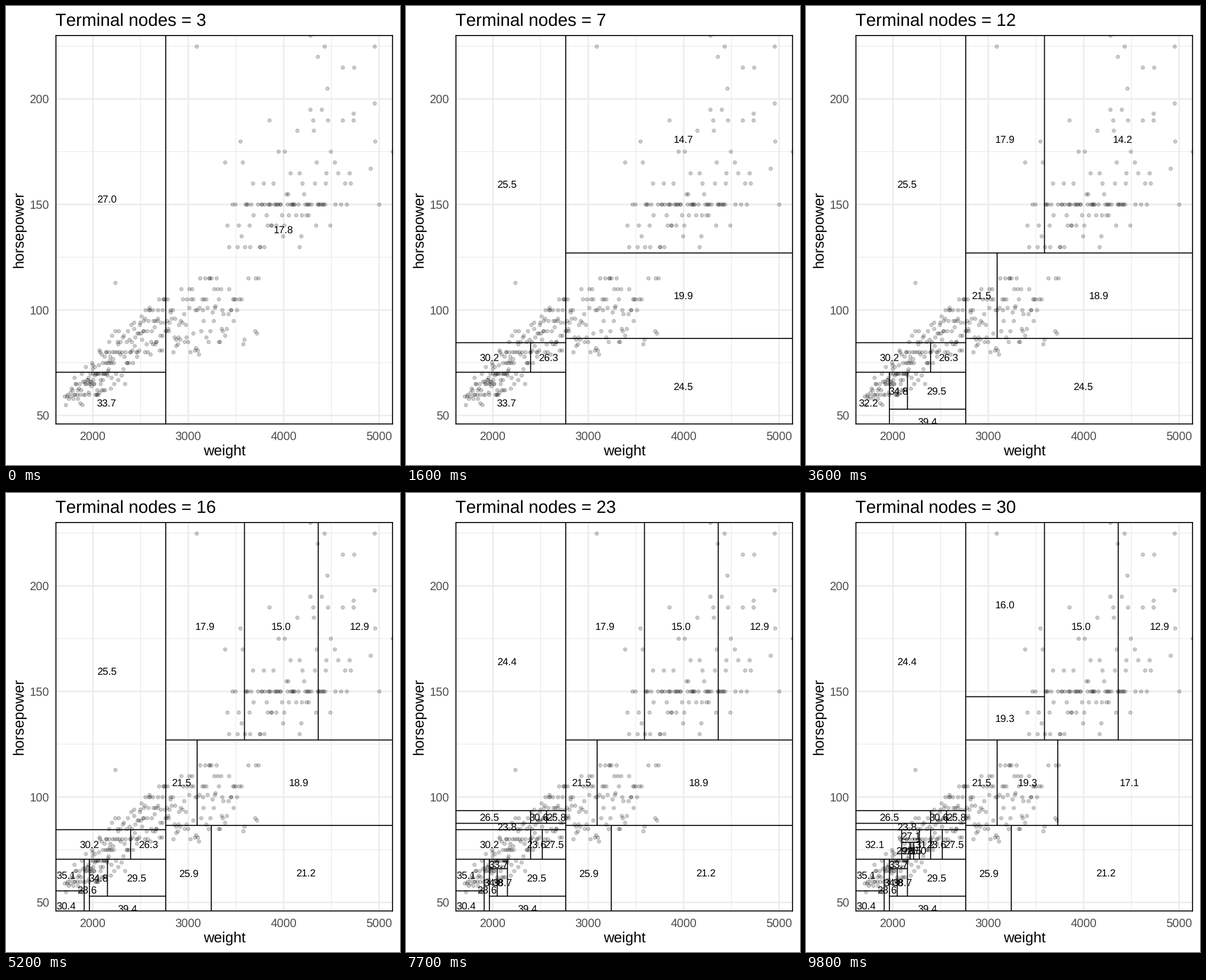
These frames come from a looping animation (693 px wide and 808 px high, 10000 ms). A matplotlib script:

```python
import numpy as np
import matplotlib.pyplot as plt
from matplotlib.animation import FuncAnimation

W, H, FRAMES = 693, 808, 100
plt.rcParams.update({"font.family": "Liberation Sans",
                     "text.hinting": "none", "text.kerning_factor": 6})
CAP = 0.358  # half of a digit's height, in em
WEIGHT, POWER = (1613, 5140), (46, 230)
LEFT, RIGHT, TOP, BOTTOM = 87.8, 679.8, 52, 735.7

# Node: (label before the split, size at which it splits, axis, cut, low, high)
COOL = ("33.7", 9, "w", 1964,
        ("32.2", 13, "w", 1909,
         ("33.1", 16, "h", 55.5, "30.4", "35.1"), "28.6"),
        ("", 9, "h", 53, "39.4",
         ("", 9, "w", 2153,
          ("34.8", 19, "h", 66,
           ("35.4", 23, "w", 2046, "34.8", "38.7"), "33.7"),
          "29.5")))
NARROW = ("", 25, "w", 2182, "29.3", ("", 25, "w", 2218, "28.5", "25.0"))
WARM = ("27.0", 5, "h", 84.5,
        ("29.2", 7, "w", 2396,
         ("30.2", 25, "w", 2093, "32.1",
          ("", 25, "w", 2278, ("", 25, "h", 78.5, NARROW, "27.1"), "31.2")),
         ("26.3", 20, "w", 2518, "23.6", "27.5")),
        ("25.5", 17, "h", 93.5,
         ("", 17, "h", 87.5, "23.8",
          ("27.0", 21, "w", 2396, "26.5",
           ("", 21, "w", 2563, "30.6", "25.8"))),
         "24.4"))
HEAVY = ("17.8", 4, "h", 127,
         ("21.2", 6, "h", 86.5,
          ("24.5", 15, "w", 3241, "25.9", "21.2"),
          ("19.9", 12, "w", 3093, "21.5",
           ("18.9", 30, "w", 3728, "19.3", "17.1"))),
         ("14.7", 8, "w", 3589,
          ("17.9", 24, "h", 147.5, "19.3", "16.0"),
          ("14.2", 14, "w", 4362, "15.0", "12.9")))
TREE = ("", 3, "w", 2764, ("", 3, "h", 70.5, COOL, WARM), HEAVY)


def start(size):
    """First frame in which the tree of this size stands still."""
    return 4 * (size - 3) if size < 20 else 68 + 3 * (size - 20)


def fade(frame, first, last):
    if first <= frame < last:
        return 1.0
    return 0.5 if frame in (first - 1, last - 1) else 0.0


def make_cars(count=380, seed=11):
    """Weights follow a quantile curve; power follows one of two trends."""
    rng = np.random.default_rng(seed)
    rank = (np.arange(count) + rng.random(count)) / count
    w = np.interp(rank, [0, 0.02, 0.09, 0.25, 0.5, 0.75, 0.97, 1],
                  [1700, 1780, 1950, 2200, 2804, 3615, 4480, 4750])
    noise = rng.normal(size=count).clip(-2, 2)
    small = np.interp(w, [1700, 2000, 2600, 3700], [57, 67, 92, 103])
    small += noise * np.interp(w, [1800, 2700], [4.5, 9])
    big = np.interp(w, [3300, 4100, 4500], [140, 148, 175])
    big = np.maximum(big + noise * 18, 129)
    big[rng.random(count) < 0.3] = 150
    p = np.where(rng.random(count) < (w - 3300) / 550, big, small)
    coarse = (p > 102) | (rng.random(count) < 0.4)
    p = np.where(coarse, 5 * np.round(p / 5), np.round(p))
    lone = [(3086, 225), (4425, 225), (4951, 225), (4278, 230), (4354, 220),
            (4615, 215), (4735, 215), (4732, 193), (4952, 198), (4955, 180),
            (4906, 167), (5140, 175), (4997, 150), (3850, 190), (2234, 113)]
    return np.vstack([np.column_stack([w, p]), lone]).T


def px(weight):
    return LEFT + (weight - WEIGHT[0]) / np.ptp(WEIGHT) * (RIGHT - LEFT)


def py(power):
    return BOTTOM - (power - POWER[0]) / np.ptp(POWER) * (BOTTOM - TOP)


fig = plt.figure(figsize=(W / 72, H / 72), dpi=72, facecolor="white")
ax = fig.add_axes([LEFT / W, 1 - BOTTOM / H,
                   (RIGHT - LEFT) / W, (BOTTOM - TOP) / H])
ax.set(xlim=WEIGHT, ylim=POWER, xticks=[], yticks=[])
for spine in ax.spines.values():
    spine.set(linewidth=1.75, color="black", zorder=6, snap=False)


def write(x, y, text, size, **kw):
    return fig.text(x / W, 1 - y / H, text, fontsize=size,
                    va="baseline", **kw)


def grid(rule, values, step):
    for v in values:
        rule(v, color="#ebebeb", lw=1.25 if v % step else 2.5,
             zorder=0, snap=False)


grid(ax.axvline, range(2000, 5001, 500), 1000)
grid(ax.axhline, range(50, 226, 25), 50)
for w in range(2000, 5001, 1000):
    write(px(w), 763.4, str(w), 20.6, ha="center", color="#4d4d4d")
for h in range(50, 201, 50):
    write(76, py(h) + 20.6 * CAP, str(h), 20.6, ha="right", color="#4d4d4d")
write(383.8, 792, "weight", 25.7, ha="center")
write(31, 394, "horsepower", 25.7, ha="center", rotation=90,
      rotation_mode="anchor")
title = write(87, 35.2, "", 30.9, ha="left")

ax.scatter(*make_cars(), s=6.2 ** 2, facecolor=(0, 0, 0, 0.2),
           edgecolor=(0, 0, 0, 0.2), linewidth=1.13, zorder=2, snap=False)

parts = []  # (artist, first frame, end frame)
NEVER = FRAMES + 9


def grow(node, box, born):
    """Add the node's label and cut line, then its two children."""
    x0, x1, y0, y1 = box
    leaf = isinstance(node, str)
    label = node if leaf else node[0]
    end = NEVER if leaf else start(node[1])
    if label:
        drop = 17.7 * CAP * np.ptp(POWER) / (BOTTOM - TOP)
        text = ax.text((x0 + x1) / 2, (y0 + y1) / 2 - drop, label,
                       fontsize=17.7, ha="center", va="baseline",
                       clip_on=True, zorder=5)
        parts.append((text, born, end))
    if leaf:
        return
    _, _, axis, cut, low, high = node
    if axis == "w":
        ends = [cut, cut], [y0, y1]
        boxes = (x0, cut, y0, y1), (cut, x1, y0, y1)
    else:
        ends = [x0, x1], [cut, cut]
        boxes = (x0, x1, y0, cut), (x0, x1, cut, y1)
    line, = ax.plot(*ends, color="black", lw=1.75, zorder=4, snap=False,
                    solid_capstyle="butt", scalex=False, scaley=False)
    parts.append((line, end, NEVER))
    grow(low, boxes[0], end)
    grow(high, boxes[1], end)


# The tree covers the data range plus 2.5 % on every side
grow(TREE, (WEIGHT[0] - 88, WEIGHT[1] + 88, POWER[0] - 4.6, POWER[1] + 4.6),
     0)


def update(frame):
    size = max(k for k in range(3, 31) if start(k) <= frame)
    title.set_text(f"Terminal nodes = {size}")
    for artist, first, end in parts:
        alpha = fade(frame, first, end)
        artist.set_alpha(alpha)
        artist.set_visible(alpha > 0)
    return [title, *(p[0] for p in parts)]


anim = FuncAnimation(fig, update, frames=FRAMES, interval=100,
                     repeat=True, repeat_delay=0, blit=False)
plt.show()
```
